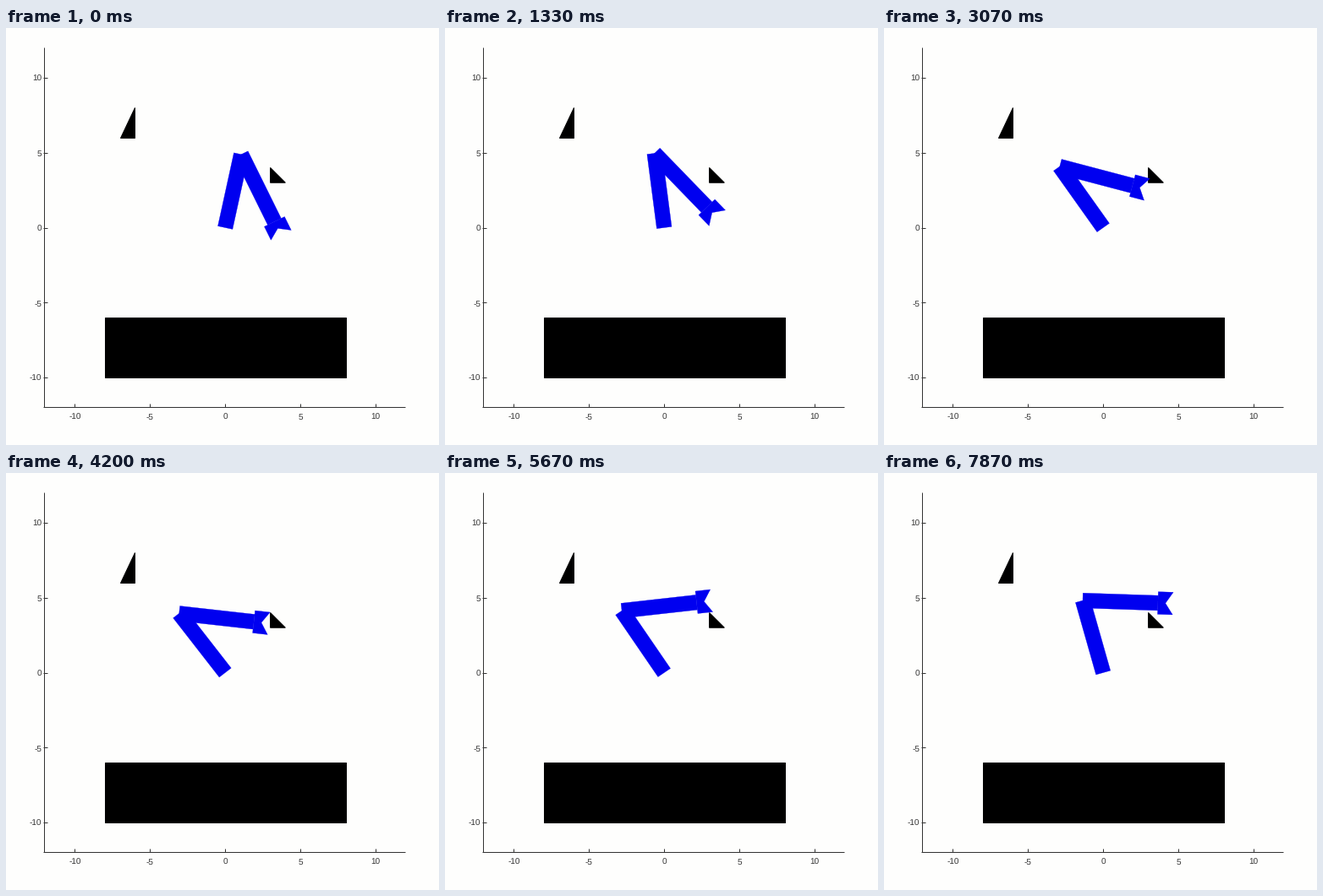
A matplotlib script that plays this animation: 512x494 px, repeating every 8000 ms.

```python
import numpy as np
import matplotlib.pyplot as plt
from matplotlib.animation import FuncAnimation
from matplotlib.patches import Polygon

plt.rcParams["text.hinting"] = "none"

W, H, DPI = 512, 494, 64
PX = 72 / DPI                      # one pixel in points
LOOP, STEP, TICK = 8000, 20, 8000 / 120
BG, INK, BLUE = "#fefefd", "#333333", "#0000f0"
ORIGIN = np.array([259.2, 236.5])
UNIT = np.array([17.79, -17.76])

# Waypoints: tick, shoulder angle, forearm angle (degrees).
TICKS, SHOULDER, FOREARM = np.transpose([
    (2, 77.7, -63.8), (20, 97.4, -46.0), (35, 116.3, -27.7),
    (49, 127.8, -11.3), (53, 127.8, -6.4), (62, 127.8, -6.4),
    (71, 127.8, -1.5), (80, 127.8, 8.0), (85, 124.3, 6.4),
    (98, 116.2, 6.1), (108, 116.2, 6.1), (118, 105.8, -1.9)])

LINK = np.array([(0, -.5), (5, -.5), (5, .5), (0, .5)])
CLAW = np.array([(5, .75), (6, .75), (5.5, 0), (6, -.75), (5, -.75)])
OBSTACLES = [
    [(-8, -6), (8, -6), (8, -10), (-8, -10)],
    [(-7, 6), (-6, 6), (-6, 8)],
    [(3, 3), (4, 3), (3, 4)],
]


def to_px(points):
    return ORIGIN + np.asarray(points) * UNIT


def heading(angle):
    return np.array([np.cos(np.radians(angle)), np.sin(np.radians(angle))])


def place(shape, angle, base=(0, 0)):
    c, s = heading(angle)
    return to_px(shape @ np.array([(c, s), (-s, c)]) + base)


fig = plt.figure(figsize=(W / DPI, H / DPI), dpi=DPI, facecolor=BG)
ax = fig.add_axes([0, 0, 1, 1])
ax.set(xlim=(0, W), ylim=(H, 0))
ax.axis("off")


def add_shape(points, color, edge):
    patch = Polygon(points, closed=True, fc=color, ec=color, lw=edge * PX,
                    joinstyle="miter")
    return ax.add_patch(patch)


def line(x, y):
    ax.plot(x, y, color=INK, lw=PX, solid_capstyle="butt", snap=True)


def label(x, y, text, **align):
    ax.text(x, y, text, family="Liberation Sans", size=10 * PX, color=INK,
            **align)


line([44.5, 44.5], [23, 449])
line([44, 472], [448.5, 448.5])
for v in range(-10, 11, 5):
    x, y = to_px((v, v))
    line([x, x], [445, 449])
    line([44, 49], [y, y])
    label(x, 460.5, str(v), ha="center", va="center_baseline")
    label(42.5, y + 0.5, str(v), ha="right", va="center_baseline")

for points in OBSTACLES:
    add_shape(to_px(points), "black", 1)

upper, fore, claw = (add_shape(place(s, 0), BLUE, 0.3)
                     for s in (LINK, LINK, CLAW))


def update(i):
    tick = int((i * STEP + 14) / TICK)
    held = tick - (tick % 3 == 0)  # the arm rests on every third tick
    a = np.interp(held, TICKS, SHOULDER)
    b = np.interp(held, TICKS, FOREARM)
    elbow = 5 * heading(a)
    upper.set_xy(place(LINK, a))
    fore.set_xy(place(LINK, b, elbow))
    claw.set_xy(place(CLAW, b, elbow))
    return upper, fore, claw


anim = FuncAnimation(fig, update, frames=LOOP // STEP, interval=STEP,
                     repeat=True, repeat_delay=0)
plt.show()
```
